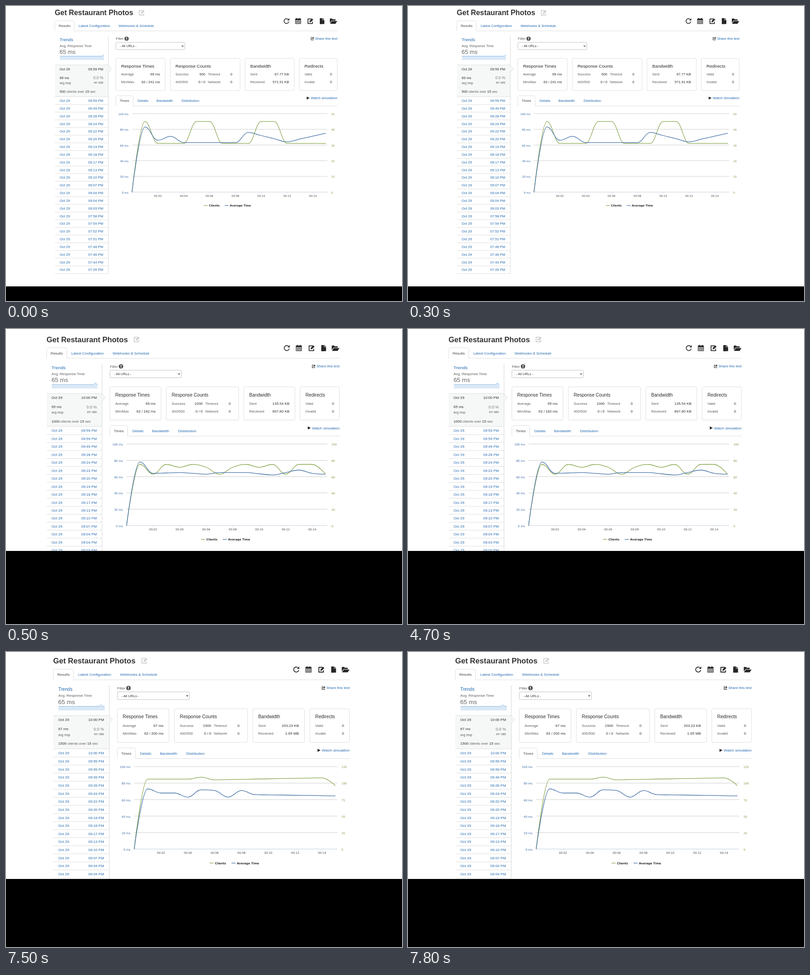
An HTML page with a canvas that plays this animation: 867x646 px, repeating every 8000 ms.

```html
<!DOCTYPE html>
<html lang="en">
<head>
<meta charset="utf-8">
<title>Load test results</title>
<style>
html, body { margin: 0; width: 100%; height: 100%; overflow: hidden; background: #fff; }
canvas { display: block; }
</style>
</head>
<body>
<canvas id="stage" width="867" height="646"></canvas>
<script>
const ctx = document.getElementById('stage').getContext('2d');
const LOOP = 8000;
const SANS = '"Liberation Sans", Arial, sans-serif';
const CHART = '"DejaVu Sans", Verdana, sans-serif';
const LINK = '#2369b0', DARK = '#2b2b2b', GREY = '#5c5c5c', RULE = '#dcdcdc', INK = '#262626';
const GREEN = '#89a54e', BLUE = '#4572a7';

const history = ('09:49 09:28 09:24 09:22 09:20 09:19 09:18 09:17 09:13 09:10 09:07 ' +
  '09:04 09:04 09:03 07:58 07:54 07:52 07:51 07:48 07:46 07:44 07:26').split(' ');

// Straight lines through a few [second, value] points.
const through = (...keys) => s => {
  const i = Math.max(1, keys.findIndex(k => k[0] >= s));
  const [a, u] = keys[i - 1], [b, w] = keys[i];
  return u + (w - u) * (s - a) / (b - a);
};

// Each view is the same page at its own zoom and offset, with its own results.
const views = [
  { start: 0, zoom: 1, x: 0, y: 0, floor: 614, now: '09:59', earlier: ['09:59'],
    avg: 69, range: '62 / 241', count: '500', sent: '67.77 KB', got: '571.91 KB',
    right: 703.5, step: 28.3, max: 50, peak: 214.5,
    clients: s => s % 5 < 2 && s < 15 ? 45 : 31,
    times: through([0, 0], [1, 83], [2, 66], [3, 71], [4, 63], [8, 63], [9, 76], [12, 64], [15, 75]) },
  { start: 500, zoom: 1.037, x: -22, y: 7.6, floor: 486, now: '10:00', earlier: ['09:59', '09:59'],
    avg: 65, range: '62 / 182', count: '1000', sent: '135.54 KB', got: '897.80 KB',
    right: 699.7, step: 28, max: 100, peak: 210,
    clients: s => s % 5 === 2 || s === 15 ? 63 : s % 2 || s > 12 ? 75 : 71.5,
    times: through([0, 0], [1, 78], [2, 64], [4, 65], [6, 63], [7, 65], [9, 65], [11, 62], [13, 68], [14, 64], [15, 63]) },
  { start: 7500, zoom: 1.0493, x: -8.8, y: 3.8, floor: 497, now: '10:00', earlier: ['10:00', '09:59', '09:59'],
    avg: 67, range: '62 / 200', count: '1500', sent: '203.23 KB', got: '1.65 MB',
    right: 699.8, step: 28, max: 125, peak: 206.6,
    clients: through([0, 0], [1, 106], [4, 106], [5, 109], [6, 105], [14, 108], [15, 96]),
    times: through([0, 0], [1, 73], [2, 68], [3, 68], [4, 63], [5, 72], [6, 71], [7, 63], [8, 71], [9, 66], [15, 64.5]) }
];

// Text centred vertically on y; returns its width.
function text(s, x, y, color = DARK, size = 7.7, align = 'left', font = SANS, weight = 400) {
  ctx.font = `${weight} ${size}px ${font}`;
  ctx.textAlign = align;
  ctx.fillStyle = color;
  ctx.fillText(s, x, y + size * 0.36);
  return ctx.measureText(s).width;
}

function line(points, color = RULE, width = 0.9) {
  ctx.beginPath();
  points.forEach(p => ctx.lineTo(p[0], p[1]));
  ctx.strokeStyle = color;
  ctx.lineWidth = width;
  ctx.stroke();
}

function shape(points, color) {
  ctx.beginPath();
  points.forEach(p => ctx.lineTo(p[0], p[1]));
  ctx.fillStyle = color;
  ctx.fill();
}

function rect(x, y, w, h, color) {
  ctx.fillStyle = color;
  ctx.fillRect(x, y, w, h);
}

function frame(x, y, w, h, color = RULE) {
  ctx.beginPath();
  ctx.roundRect(x, y, w, h, 2.2);
  ctx.strokeStyle = color;
  ctx.lineWidth = 0.9;
  ctx.stroke();
}

function tabs(x1, x2, top, bottom, first, others) {
  line([[x1, bottom], [x1, top + 2], [x1 + 2, top], [x2 - 2, top], [x2, top + 2], [x2, bottom], [725.3, bottom]]);
  const mid = (top + bottom) / 2;
  text(first, (x1 + x2) / 2, mid, '#444', 7.7, 'center');
  others.forEach(([s, x]) => text(s, x, mid, LINK));
}

function pencilBox(x, y, color) {
  ctx.save();
  ctx.translate(x, y);
  ctx.lineJoin = 'round';
  line([[3, -4.8], [-5.2, -4.8], [-5.2, 5.2], [4.6, 5.2], [4.6, 1.4]], color, 1.7);
  shape([[-1.9, 2.3], [-1.6, -0.3], [3.8, -5.7], [6.4, -3.1], [0.9, 2.1]], color);
  ctx.restore();
}

function toolbar() {
  ctx.beginPath();
  ctx.arc(614, 33, 5.3, 0.2, 5.4);
  ctx.strokeStyle = INK;
  ctx.lineWidth = 1.6;
  ctx.stroke();
  shape([[620.3, 26.7], [620.3, 31.6], [615.4, 31.6]], INK);

  rect(633.2, 27.6, 12.6, 11.6, INK);
  for (const x of [635.6, 641.6]) rect(x, 26.2, 1.8, 3, INK);
  for (let i = 0; i < 12; i++) rect(634.2 + i % 4 * 2.8, 31 + (i >> 2) * 2.6, 2.1, 1.9, '#eee');

  pencilBox(666.3, 33.1, INK);

  rect(687, 26.6, 5.6, 12.8, INK);
  rect(687, 30.9, 10, 8.5, INK);
  shape([[693.3, 26.6], [697, 30.1], [693.3, 30.1]], INK);

  shape([[709, 27.6], [714, 27.6], [715.2, 29.2], [721.5, 29.2], [721.5, 32], [712.8, 32], [709, 37]], INK);
  shape([[713.2, 33], [725.2, 33], [721.3, 38.9], [709.3, 38.9]], INK);
}

function sidebar(v) {
  text('Trends', 117.5, 73.7, LINK, 9.6);
  text('Avg. Response Time', 117.5, 87, GREY, 7.6);
  text('65 ms', 117.3, 100.2, '#666', 12.8);

  const spark = [];
  for (let x = 118; x <= 214.5; x += 0.5)
    spark.push([x, 109.8 - 3 * Math.exp(-(((x - v.peak) / 2.4) ** 2))]);
  shape([...spark, [214.5, 118.3], [118, 118.3]], '#dae8f6');
  line(spark, '#79addf');

  const arrow = [[224, 129.3], [231, 137.5], [224, 145.7]];
  rect(107, 129, 117, 69.3, '#f6f7f7');
  line([[224, 66], [224, 586]], '#d8d8d8', 1);
  shape(arrow, '#f6f7f7');
  line(arrow, '#d8d8d8', 0.8);
  line([[107, 129], [224, 129]]);

  text('Oct 29', 117.5, 137.8);
  text(v.now + ' PM', 213, 137.8, DARK, 7.7, 'right');
  text(v.avg + ' ms', 117.5, 156.8);
  text('0.0 %', 213, 157.2, '#777', 8.5, 'right');
  text('avg resp', 117.5, 169, GREY, 6.5);
  text('err rate', 213, 167.6, GREY, 6.4, 'right');
  let x = 117.5;
  [[v.count, DARK], [' clients over ', GREY], ['15', DARK], [' sec', GREY]]
    .forEach(([s, c]) => x += text(s, x, 187.5, c));

  line([[107, 198.5], [224, 198.5]]);
  [...v.earlier, ...history].forEach((t, i) => {
    const y = 207.3 + i * 16.83;
    text('Oct 29', 117.5, y, LINK);
    text(t + ' PM', 213, y, LINK, 7.7, 'right');
    line([[107, y + 8.3], [224, y + 8.3]]);
  });
}

// Each column spans [from, to] inside the card and holds name and value pairs.
function card(x, w, title, ...columns) {
  frame(x, 114.8, w, 70.2);
  text(title, x + 11.4, 131.4, DARK, 9.75);
  columns.forEach(([from, to, rows]) => rows.forEach(([name, value], i) => {
    const y = 149.6 + i * 16.4;
    text(name, x + from, y, GREY, 7.6);
    text(value, x + to, y, DARK, 7.7, 'right');
  }));
}

function cards(v) {
  card(240.5, 108, 'Response Times', [11.4, 96.5, [['Average', v.avg + ' ms'], ['Min/Max', v.range + ' ms']]]);
  card(359.6, 152.8, 'Response Counts',
    [11.4, 76.8, [['Success', v.count], ['400/500', '0 / 0']]],
    [82.3, 135.9, [['Timeout', '0'], ['Network', '0']]]);
  card(523.3, 107.8, 'Bandwidth', [11.4, 96.3, [['Sent', v.sent], ['Received', v.got]]]);
  card(642.2, 83, 'Redirects', [11.4, 71.5, [['Valid', '0'], ['Invalid', '0']]]);
}

const between = (n, a, b) => Math.min(Math.max(n, Math.min(a, b)), Math.max(a, b));

// Smooth curve whose control points never overshoot the data.
function spline(pts, color) {
  const k = 1.5, d = k + 1;
  let out = pts[0];
  ctx.beginPath();
  ctx.moveTo(...out);
  for (let i = 1; i < pts.length; i++) {
    const [x, y] = pts[i], [px, py] = pts[i - 1];
    let inn = [x, y], next = [x, y];
    if (i < pts.length - 1) {
      const [nx, ny] = pts[i + 1];
      const lx = (k * x + px) / d, rx = (k * x + nx) / d;
      const slope = (ny - py) / (nx - px);
      const ly = between(y + slope * (lx - x), py, y);
      const ry = between(2 * y - ly, ny, y);
      inn = [lx, 2 * y - ry];
      next = [rx, ry];
    }
    ctx.bezierCurveTo(...out, ...inn, x, y);
    out = next;
  }
  ctx.strokeStyle = color;
  ctx.lineWidth = 1.25;
  ctx.lineJoin = 'round';
  ctx.stroke();
}

function legend(name, x, color) {
  line([[x, 436.9], [x + 8.6, 436.9]], color, 1.2);
  text(name, x + 11.3, 436.9, DARK, 6, 'left', CHART, 700);
}

function chart(v) {
  const left = 275.8, base = 407.6, height = 172;
  for (let i = 0; i <= 5; i++) {
    const y = base - i * height / 5;
    line([[left, y], [v.right, y]], i ? '#cdcdcd' : '#c3cfdc', 0.95);
    text(i * 20 + ' ms', 268, y + 1, '#3565a3', 5.95, 'right', CHART);
    text(String(i * v.max / 5), v.right + 8.5, y + 1, '#7d9a40', 5.95, 'left', CHART);
  }
  for (let s = 0; s < 16; s += 2) {
    const x = left + s * v.step;
    line([[x, base], [x, base + 3.2]], '#c0d0e0', 0.7);
    if (s) text('00:' + String(s).padStart(2, '0'), x, 415.9, '#4a4a4a', 5.9, 'center', CHART);
  }
  const plot = (value, max) => Array.from({ length: 16 }, (_, s) =>
    [left + s * v.step, base - (s && value(s)) / max * height]);
  spline(plot(v.clients, v.max), GREEN);
  spline(plot(v.times, 100), BLUE);
  legend('Clients', 433, GREEN);
  legend('Average Time', 478.8, BLUE);
}

function controls() {
  text('Filter', 240.5, 71.4, GREY);
  ctx.beginPath();
  ctx.arc(264, 71.6, 4.7, 0, Math.PI * 2);
  ctx.fillStyle = '#505050';
  ctx.fill();
  rect(263.2, 68.4, 1.6, 3.9, '#fff');
  rect(263.2, 73.2, 1.6, 1.5, '#fff');
  frame(240.6, 79.6, 150.8, 16, '#bdbdbd');
  text('- All URLs -', 249, 87.8, '#333', 7.2);
  line([[384.7, 86.6], [386.6, 88.6], [388.5, 86.6]], '#333', 1.1);

  line([[670, 68.7], [667.8, 68.7], [667.8, 74.4], [673.2, 74.4], [673.2, 72.6]], '#333', 1);
  line([[669.9, 72.3], [670.4, 70.6], [672.2, 70]], '#333', 1.2);
  shape([[671.7, 67.4], [674.8, 69.9], [671.7, 72.3]], '#333');
  text('Share this test', 725.5, 71.2, LINK, 7.65, 'right');

  shape([[658.4, 198.4], [664.6, 201.6], [658.4, 204.8]], '#222');
  text('Watch simulation', 725.5, 201.6, LINK, 7.7, 'right');
}

function draw(v) {
  ctx.setTransform(1, 0, 0, 1, 0, 0);
  rect(0, 0, 867, 646, '#fff');
  ctx.setTransform(v.zoom, 0, 0, v.zoom, v.x, v.y);
  text('Get Restaurant Photos', 106.8, 14.5, '#333', 15.85, 'left', SANS, 700);
  pencilBox(297, 14.7, '#cfcfcf');
  toolbar();
  tabs(107, 149.4, 32.4, 54.5, 'Results', [['Latest Configuration', 159], ['Webhooks & Schedule', 246.4]]);
  sidebar(v);
  controls();
  cards(v);
  tabs(240.5, 278.2, 196.5, 218.8, 'Times', [['Details', 288], ['Bandwidth', 329.5], ['Distribution', 384.5]]);
  chart(v);
  ctx.setTransform(1, 0, 0, 1, 0, 0);
  rect(0, v.floor, 867, 646 - v.floor, '#000');
}

let shown = null;
const begin = performance.now();
function tick() {
  const t = (performance.now() - begin) % LOOP;
  const v = views.filter(w => w.start <= t).pop();
  if (v !== shown) draw(shown = v);
  requestAnimationFrame(tick);
}
tick();
</script>
</body>
</html>
```
